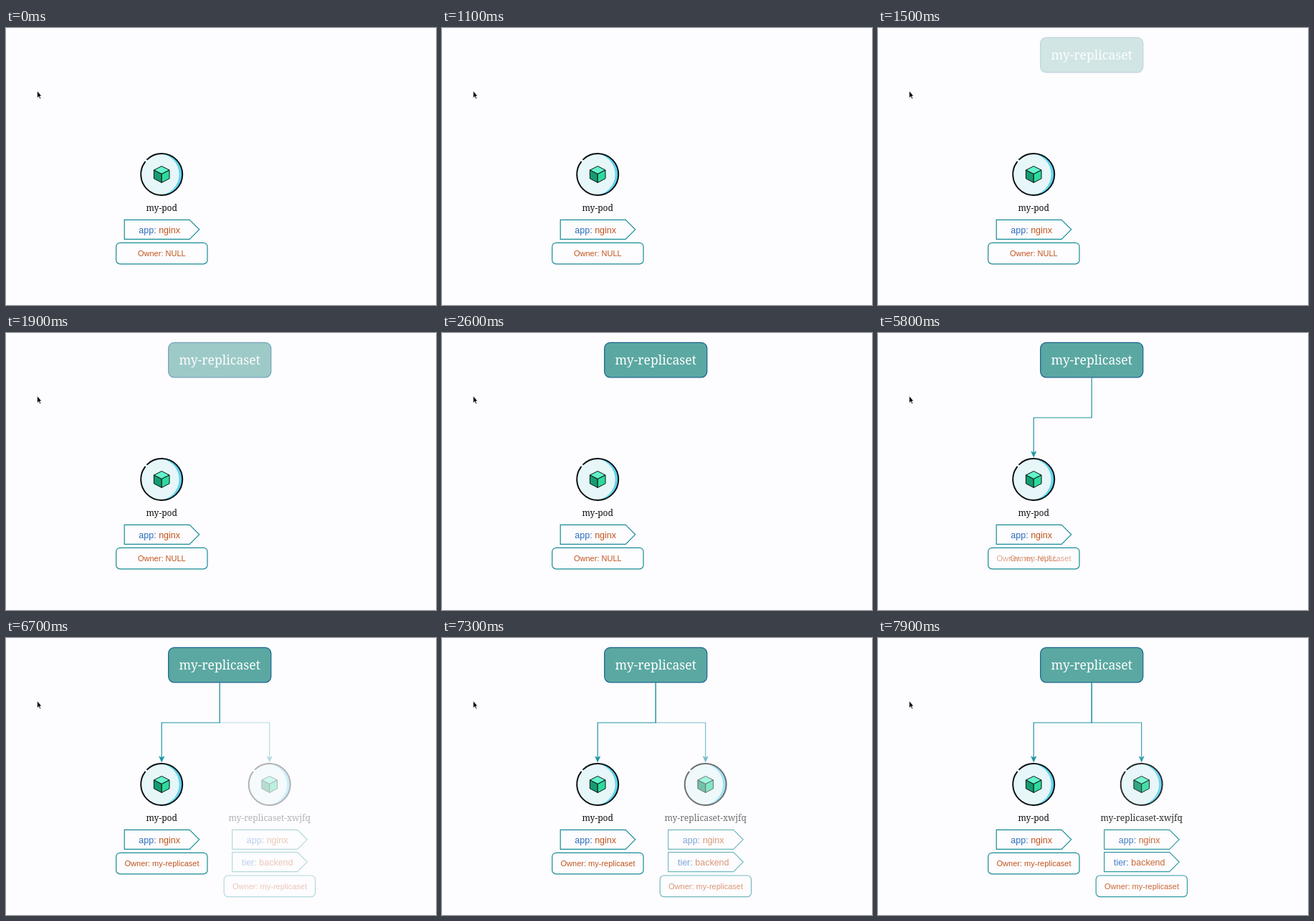
These frames come from a looping animation (600 px wide and 386 px high, 8000 ms). An HTML page with a canvas:

```html
<!DOCTYPE html>
<html lang="en">
<head>
<meta charset="utf-8">
<title>Replica set adopting a pod</title>
<style>
html, body { margin: 0; width: 100%; height: 100%; overflow: hidden; background: #fdfcfe; }
canvas { display: block; width: 600px; height: 386px; }
</style>
</head>
<body>
<canvas id="stage" width="600" height="386"></canvas>
<script>
const W = 600, H = 386, LOOP = 8000, STEP = 100;
const TEAL = '#168c96', LINE = '#1b94a6', BLUE = '#2b6cbd', RUST = '#c0541b', INK = '#0b1013';
const SERIF = '"Noto Serif", serif';
const SANS = '"Liberation Sans", Arial, sans-serif';

const screen = document.getElementById('stage').getContext('2d');
const layer = document.createElement('canvas');
layer.width = W;
layer.height = H;
const layerCtx = layer.getContext('2d');

const ramp = (t, from, to) => Math.min(1, Math.max(0, (t - from) / (to - from)));

// Draws a group on its own layer so overlapping parts fade as one.
function fade(alpha, draw) {
  if (alpha <= 0) return;
  if (alpha >= 1) return draw(screen);
  layerCtx.clearRect(0, 0, W, H);
  draw(layerCtx);
  screen.globalAlpha = alpha;
  screen.drawImage(layer, 0, 0);
  screen.globalAlpha = 1;
}

function poly(c, points, fill, stroke, width = 1) {
  c.beginPath();
  points.forEach(([x, y]) => c.lineTo(x, y));
  c.closePath();
  paint(c, fill, stroke, width);
}

function paint(c, fill, stroke, width) {
  if (fill) {
    c.fillStyle = fill;
    c.fill();
  }
  if (stroke) {
    c.strokeStyle = stroke;
    c.lineWidth = width;
    c.stroke();
  }
}

function roundBox(c, x, y, w, h, r, fill, stroke, width) {
  c.beginPath();
  c.roundRect(x, y, w, h, r);
  paint(c, fill, stroke, width);
}

function label(c, text, x, y, font, color, align = 'center') {
  c.font = font;
  c.fillStyle = color;
  c.textAlign = align;
  c.fillText(text, x, y);
}

function replicaSet(c) {
  roundBox(c, 226.7, 13.3, 143.1, 48.5, 8, '#5ba8a2', '#17618d', 1.2);
  label(c, 'my-replicaset', 298.2, 44, '17.6px ' + SERIF, '#fff');
}

function connector(c, x) {
  c.beginPath();
  c.moveTo(298.2, 62.5);
  c.lineTo(298.2, 118);
  c.lineTo(x, 118);
  c.lineTo(x, 167);
  paint(c, null, LINE, 1.2);
  poly(c, [[x, 172.8], [x - 3.4, 165], [x, 167], [x + 3.4, 165]], LINE, LINE, 0.8);
}

function cube(c, x, y) {
  const top = [x, y - 11.5], mid = [x, y - 0.5], low = [x, y + 11.5];
  const lt = [x - 10.8, y - 6], rt = [x + 10.8, y - 6];
  const lb = [x - 10.8, y + 5.8], rb = [x + 10.8, y + 5.8];
  c.lineJoin = 'round';
  poly(c, [top, rt, mid, lt], '#62f3ca', INK);
  poly(c, [lt, mid, low, lb], '#159c70', INK);
  poly(c, [rt, rb, low, mid], '#2cdb9c', INK);
  c.lineJoin = 'miter';
}

function podIcon(c, x) {
  const y = 204, r = 29, deg = Math.PI / 180;
  c.save();
  c.beginPath();
  c.arc(x, y, r, 0, 7);
  c.clip();
  c.fillStyle = '#62d3ec';
  c.fillRect(x - r, y - r, 2 * r, 2 * r);
  c.beginPath();
  c.arc(x - 4.5, y, r, 0, 7);
  c.rect(x - r, y - r, r - 3, 2 * r);
  c.fillStyle = '#e6f6f9';
  c.fill();
  c.restore();
  c.beginPath();
  c.arc(x, y, r, 226 * deg, 577 * deg);
  c.lineCap = 'round';
  paint(c, null, INK, 2);
  c.lineCap = 'butt';
  cube(c, x, y);
}

function tag(c, x, y, key, value) {
  poly(c, [[x - 52, y], [x + 39, y], [x + 52.5, y + 13.5], [x + 39, y + 27], [x - 52, y + 27]], null, TEAL, 1.2);
  const font = '12.5px ' + SANS;
  c.font = font;
  const keyWidth = c.measureText(key + ' ').width;
  const left = x - 3 - (keyWidth + c.measureText(value).width) / 2;
  label(c, key, left, y + 18.5, font, BLUE, 'left');
  label(c, value, left + keyWidth, y + 18.5, font, RUST, 'left');
}

function ownerBox(c, x, y) {
  roundBox(c, x - 63.5, y, 127.3, 29.6, 5.5, null, TEAL, 1.2);
}

function ownerText(c, name, x, y) {
  label(c, 'Owner: ' + name, x + 0.3, y + 18.8, '11px ' + SANS, RUST);
}

function pod(c, x, name, tags) {
  podIcon(c, x);
  label(c, name, x, 254.7, '12.1px ' + SERIF, '#111');
  tags.forEach(([key, value], i) => tag(c, x, 267.3 + 31.3 * i, key, value));
  ownerBox(c, x, 268 + 31.7 * tags.length - 0.4);
}

function newPod(c) {
  const x = 367.7;
  connector(c, x);
  pod(c, x, 'my-replicaset-xwjfq', [['app:', 'nginx'], ['tier:', 'backend']]);
  ownerText(c, 'my-replicaset', x, 331);
}

function cursor(c) {
  poly(c, [[43.6, 87.8], [43.6, 97.4], [45.7, 95.5], [47.2, 98.8], [48.6, 98.1],
    [47.1, 95], [49.6, 94.8]], '#000', '#fff', 0.6);
}

function render(t) {
  const x = 217.2;
  const owned = ramp(t, 5100, 6500);
  screen.fillStyle = '#fdfcfe';
  screen.fillRect(0, 0, W, H);
  fade(ramp(t, 3300, 5100), c => connector(c, x));
  fade(ramp(t, 6050, 8150), newPod);
  fade(ramp(t, 1180, 2400), replicaSet);
  pod(screen, x, 'my-pod', [['app:', 'nginx']]);
  fade(1 - owned, c => ownerText(c, 'NULL', x - 0.2, 299.3));
  fade(owned, c => ownerText(c, 'my-replicaset', x, 299.3));
  cursor(screen);
}

const start = performance.now();
function tick() {
  const t = (performance.now() - start) % LOOP;
  render(Math.floor(t / STEP) * STEP);
  requestAnimationFrame(tick);
}
tick();
</script>
</body>
</html>
```
